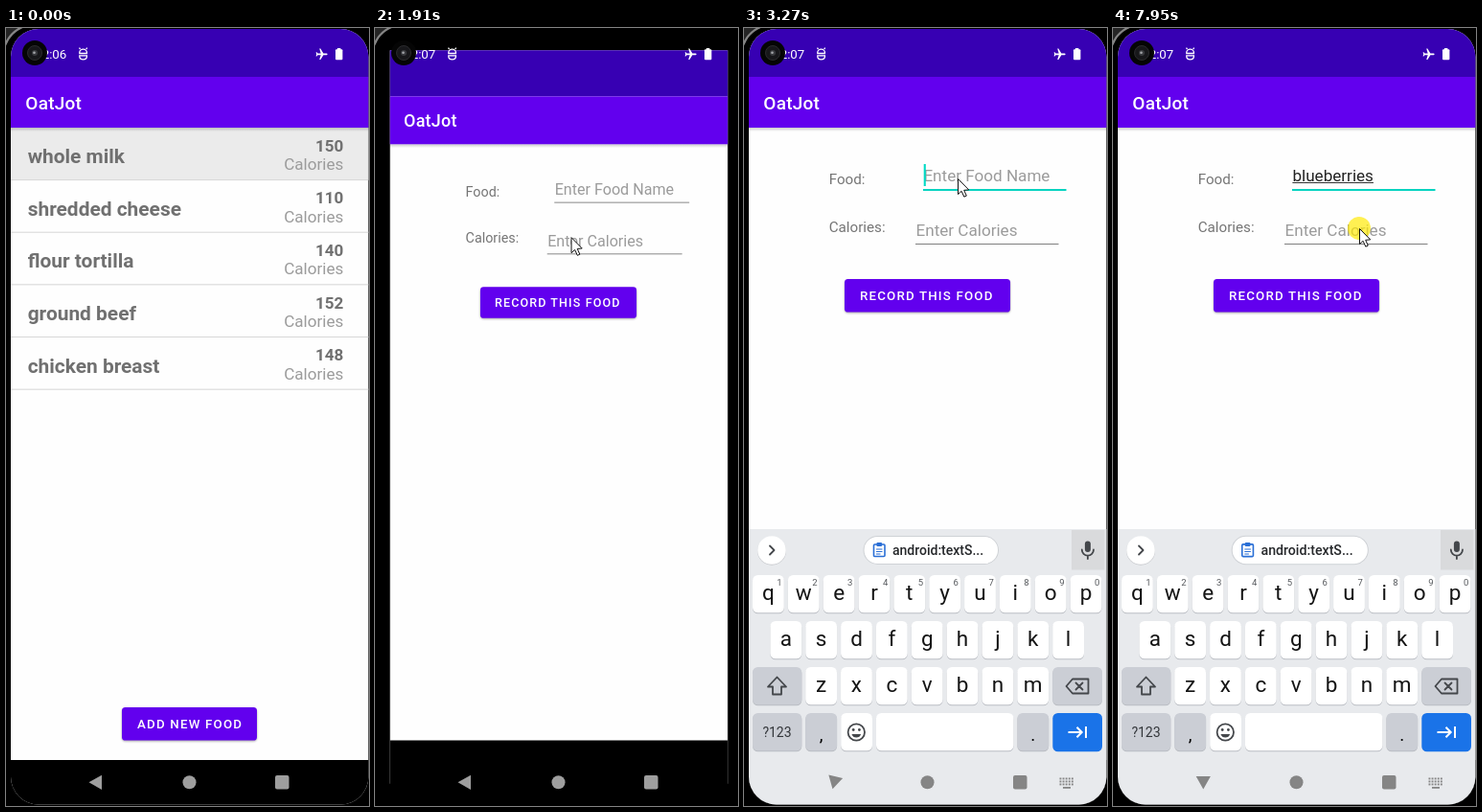
An HTML page that plays this animation: 379 px wide and 812 px high, repeating every 8 s.

```html
<!DOCTYPE html>
<html lang="en">
<head>
<meta charset="utf-8">
<title>Food log</title>
<style>
  html, body { margin: 0; width: 100%; height: 100%; overflow: hidden; background: #000; }
  svg { display: block; width: 379px; height: 812px; font-family: Roboto, "Noto Sans", sans-serif; }
  text { white-space: pre; }
  .mid { text-anchor: middle; }
  .end { text-anchor: end; }
  .bold { font-weight: 700; }
  .title { font-size: 19px; font-weight: 500; letter-spacing: .24px; fill: #fff; }
  .food { font-size: 20.9px; fill: #707070; }
  .num { font-size: 17.1px; fill: #707070; }
  .cal, .hint { font-size: 17.1px; fill: #9b9b9b; }
  .label { font-size: 15.2px; fill: #757575; }
  .entry { font-size: 17.1px; fill: #222; }
  .btn { font-size: 13.3px; font-weight: 500; letter-spacing: 1.19px; fill: #fff; }
  .key { font-size: 22.5px; fill: #141414; }
  .sup { font-size: 9.5px; fill: #55585c; }
  .line { fill: none; stroke: #44474b; stroke-width: 1.8; stroke-linejoin: round; stroke-linecap: round; }
</style>
</head>
<body>
<svg id="stage" viewBox="0 0 379 812"></svg>
<script>
const LOOP = 8000;
const APP = 'OatJot';
const WORD = 'blueberries';
const FIELD_X = 187.4;

const rect = (x, y, w, h, fill, r = 0, extra = '') =>
  `<rect x="${x}" y="${y}" width="${w}" height="${h}" rx="${r}" fill="${fill}" ${extra}/>`;
const text = (x, y, cls, str, extra = '') =>
  `<text x="${x}" y="${y}" class="${cls}" ${extra}>${str}</text>`;

const page = (id, body) => `<g id="${id}">
  ${rect(5, 0, 374, 812, '#fefefe')}
  ${rect(5, 104, 374, 4, 'url(#shade)')}
  ${rect(5, 0, 374, 51, '#3700b3')}
  ${rect(5, 51, 374, 53, '#6200ee')}
  ${text(20.3, 85, 'title', APP)}
  ${body}
  ${rect(5, 764, 374, 60, '#000')}
</g>`;

const button = (id, x, y, w, label) => `
  ${rect(x, y + 1.5, w, 34, '#000', 4, 'opacity=".35" filter="url(#soft)"')}
  ${rect(x, y + 6, w, 35, '#000', 4, `id="${id}Lift" opacity="0" filter="url(#wide)"`)}
  ${rect(x, y, w, 34.5, '#6200ee', 3.6)}
  ${rect(x, y, w, 34.5, '#fff', 3.6, `id="${id}Glow" opacity="0"`)}
  ${text(x + 16, y + 22.3, 'btn', label)}`;

function listBody() {
  const foods = [['whole milk', 150], ['shredded cheese', 110], ['flour tortilla', 140],
                 ['ground beef', 152], ['chicken breast', 148]];
  const rows = foods.map(([name, kcal], i) => {
    const y = i * 54.65;
    return text(22.7, 141 + y, 'food bold', name) +
      text(352.3, 128.7 + y, 'num bold end', kcal) +
      text(352.3, 148 + y, 'cal end', 'Calories') +
      rect(5, 158 + y, 374, 1.1, '#d9d9d9');
  });
  return rect(5, 104, 374, 54, '#ebebeb', 0, 'id="rowHi"') + rect(5, 104, 374, 4, 'url(#shade)') +
    rows.join('') + button('add', 121, 709, 141, 'ADD NEW FOOD');
}

const formBody = () =>
  text(88.7, 162.5, 'label', 'Food:') + text(88.7, 213.3, 'label', 'Calories:') +
  text(FIELD_X, 160, 'hint', 'Enter Food Name', 'id="hint"') +
  text(FIELD_X, 160, 'entry', WORD, 'id="entry"') +
  rect(FIELD_X, 161, 0, 1, '#333', 0, 'id="under"') +
  rect(187, 168, 149.5, 1, '#808080', 0, 'id="foodLine"') +
  rect(187, 142, 2.1, 23, '#03dac5', 0, 'id="caret"') +
  text(179.5, 217, 'hint', 'Enter Calories') +
  rect(179, 225, 149.5, 1, '#808080') +
  button('rec', 105, 262, 173, 'RECORD THIS FOOD');

function keyboard() {
  const pitch = 36.85, white = '#fff', grey = '#cbced5';
  const cap = (x, y, w, fill) =>
    rect(x, y + 1, w, 39.3, '#b9bcc2', 5.5) + rect(x, y, w, 39.3, fill, 5.5);
  const row = (keys, cx, y) => [...keys].map((k, i) =>
    cap(cx + i * pitch - 16.4, y, 32.8, white) +
    text(cx + i * pitch, y + 26.3, 'key mid', k)).join('');
  const sups = [...'1234567890'].map((d, i) =>
    text(37 + i * pitch, 582, 'sup mid', d)).join('');
  return `<g id="board">
    ${rect(5, 523, 374, 300, '#e8eaed')}
    <circle cx="29" cy="545.7" r="15" fill="#c9cbcf"/><circle cx="29" cy="545" r="14.8" fill="#fff"/>
    <path class="line" d="M27 540.5l4.5 4.5-4.5 4.5"/>
    <g id="chip">
      ${rect(125, 530.5, 140.5, 29, '#fff', 14.5, 'stroke="#cfd2d6"')}
      ${rect(135.5, 539, 11.5, 12.5, 'none', 1, 'stroke="#2a6fd6" stroke-width="1.6"')}
      ${rect(138.4, 537, 5.7, 4, '#2a6fd6', 1)}
      <path d="M138 544h6.5M138 546.5h6.5M138 549h4.5" stroke="#2a6fd6"/>
      ${text(155, 550.2, '', 'android:textS...', 'font-size="14" font-weight="500" fill="#26282b"')}
    </g>
    ${rect(342, 524, 34.5, 41.5, '#d9dadc')}
    ${rect(355.9, 535.5, 6, 11.5, '#44474b', 3)}
    <path class="line" d="M352.8 544.5a6.1 6.1 0 0 0 12.2 0M358.9 551v3"/>
    ${row('qwertyuiop', 25.4, 571)}${sups}
    ${row('asdfghjkl', 43.8, 619)}
    ${row('zxcvbnm', 80.6, 667)}
    ${cap(9, 667, 51.3, grey)}${cap(322.3, 667, 51.7, grey)}
    <path class="line" d="M34.5 677.5l-9.5 10h5v8h9v-8h5z"/>
    <path class="line" d="M343 679.5h16.5v15H343l-6.5-7.5zM346.5 683.5l7 7m0-7l-7 7"/>
    ${cap(9, 715, 51.3, grey)}
    ${text(34.5, 740, 'mid', '?123', 'font-size="14" fill="#33363a"')}
    ${cap(64.3, 715, 32.8, grey)}${text(80.7, 744, 'mid', ',', 'font-size="19"')}
    ${cap(101.2, 715, 32.8, white)}
    <circle class="line" cx="117.3" cy="735" r="8.7"/>
    <circle cx="114.2" cy="732.5" r="1.4" fill="#44474b"/><circle cx="120.4" cy="732.5" r="1.4" fill="#44474b"/>
    <path d="M112.5 737h9.6a5 5 0 0 1-9.6 0z" fill="#44474b"/>
    ${cap(138, 715, 143.5, white)}
    ${cap(285.4, 715, 32.8, grey)}${text(301.8, 744, 'mid', '.', 'font-size="19"')}
    ${rect(322.3, 715, 51.7, 40.3, '#1a73e8', 5.5)}
    <path d="M338.5 735h14m-5-5.2l5.2 5.2-5.2 5.2M357 729v12" fill="none" stroke="#fff" stroke-width="2"/>
  </g>`;
}

function imeIcon() {
  let dots = '';
  for (let i = 0; i < 15; i++) dots += rect(329.5 + i % 5 * 3.1, 782.5 + (i / 5 | 0) * 3, 1.9, 1.9, 'currentColor');
  return `<g id="ime">${dots}${rect(333, 792, 8, 1.8, 'currentColor')}</g>`;
}

const nav = `<g id="nav">
  <path id="back" d="M86.5 787.3L100 779.7v15.2z" fill="currentColor"/>
  <circle cx="191.5" cy="787.3" r="7" fill="currentColor"/>
  ${rect(281, 780, 14.5, 14.5, 'currentColor', 2)}${imeIcon()}
</g>`;

const status = `
  ${text(63.3, 32, 'end', '2:06', 'id="clock" font-size="13.3" fill="#fff"')}
  <g fill="none" stroke="#fff" stroke-width="1.3">
    <path d="M76.8 26.5v-1a3.8 3.3 0 0 1 7.6 0v1zM76.8 28.8h7.6v1a3.8 3 0 0 1-7.6 0zM77.5 22l-1-1.3M83.7 22l1-1.3"/>
  </g>
  <path transform="translate(329.6 27.3) rotate(90) scale(.6) translate(-11.5 -12)" fill="#fff"
    d="M21 16v-2l-8-5V3.5a1.5 1.5 0 0 0-3 0V9l-8 5v2l8-2.5V19l-2 1.5V22l3.5-1 3.5 1v-1.5L13 19v-5.5l8 2.5z"/>
  ${rect(344, 22.3, 7.4, 10.9, '#fff', 1)}${rect(346, 21, 3.4, 2, '#fff')}
  <circle cx="30" cy="26" r="13" fill="#050505"/>
  <circle cx="30" cy="26" r="7.5" fill="#17171a" stroke="#2b2b2e"/>
  <circle cx="30" cy="26" r="3" fill="#38393d"/><circle cx="29.5" cy="25.8" r="1.3" fill="#a5a7ab"/>`;

const stage = document.getElementById('stage');
stage.innerHTML = `
  <defs>
    <clipPath id="screen"><rect x="5" y="1" width="373.4" height="809.5" rx="29"/></clipPath>
    <linearGradient id="shade" x2="0" y2="1">
      <stop stop-color="#000" stop-opacity=".2"/><stop offset="1" stop-color="#000" stop-opacity="0"/>
    </linearGradient>
    <filter id="soft" x="-10%" y="-30%" width="120%" height="160%"><feGaussianBlur stdDeviation="1.3"/></filter>
    <filter id="wide" x="-10%" y="-50%" width="120%" height="200%"><feGaussianBlur stdDeviation="3"/></filter>
  </defs>
  ${rect(0, 0, 379, 812, '#000')}
  <path d="M0 0h14A30 30 0 0 0 0 14z" fill="#252525"/>
  <path d="M-1 18A34 34 0 0 1 17 -1" fill="none" stroke="#858585" stroke-width="2.2"/>
  <g clip-path="url(#screen)">
    ${page('list', listBody())}${page('form', formBody())}${keyboard()}${nav}${status}
  </g>
  <circle id="tap" r="12" fill="#ffe900" opacity=".68"/>
  <path id="mouse" d="M.5 .5V16.6L4.1 13.3 6.8 19.2 9.3 18.1 6.7 12.3 11.7 11.9z"
    fill="#fff" stroke="#111" stroke-linejoin="round"/>`;

const el = {};
stage.querySelectorAll('[id]').forEach(n => el[n.id] = n);

// Each track is [time, value, ...] with linear steps between.
const tracks = {
  mouse: [[130, 260, 773], [550, 208, 731], [1250, 208, 731], [1400, 207, 610], [1600, 204, 350],
          [1780, 203, 232], [1950, 205, 214], [2250, 212, 202], [2520, 223, 157], [7420, 223, 157],
          [7580, 262, 203], [7680, 257, 209]],
  oldScale: [[1740, 1], [1780, 1.003], [1850, 1.05], [1950, 1.12], [2150, 1.15]],
  newScale: [[1740, .85], [1780, .853], [1850, .9], [1950, .97], [2150, 1]],
  newAlpha: [[1790, 0], [1870, 1]],
  press: [[950, 0], [1100, 1]],
  rowHi: [[950, 1], [1030, 0]],
  slide: [[2990, 289], [3050, 210], [3120, 95], [3190, 25], [3260, 0]],
  boardAlpha: [[2990, 0], [3050, .17], [3120, .7], [3180, 1]],
  turn: [[3060, 0], [3270, -76], [3340, -90]],
  navTone: [[3050, 158], [3200, 133]],
  chip: [[3270, 1], [3340, 1.012]]
};
const typed = [3610, 3810, 4030, 4280, 5270, 6010, 6190, 6390, 6610, 6930, 7260];
const lined = [3810, 4030, 4280, 4540, 5550, 6190, 6390, 6610, 6930, 7260, 7500];
const taps = [[950, 1150], [2590, 2720], [7830, 8000]];
const caretOn = [[2620, 3410], [3610, 5090], [5270, 7830]];

function at(name, t) {
  const k = tracks[name];
  if (t <= k[0][0]) return k[0].slice(1);
  const i = k.findIndex(s => s[0] > t);
  if (i < 0) return k[k.length - 1].slice(1);
  const a = k[i - 1], b = k[i], p = (t - a[0]) / (b[0] - a[0]);
  return a.slice(1).map((v, j) => v + (b[j + 1] - v) * p);
}
const one = (name, t) => at(name, t)[0];
const set = (node, attr, value) => node.setAttribute(attr, value);
const show = (node, on) => set(node, 'visibility', on ? 'inherit' : 'hidden');
const within = (spans, t) => spans.some(([a, b]) => t >= a && t < b);
const count = (times, t) => times.filter(x => x <= t).length;
const zoom = (s, x, y) => `translate(${x} ${y}) scale(${s}) translate(${-x} ${-y})`;

const ruler = document.createElement('canvas').getContext('2d');
function widthOf(n) {
  ruler.font = '17.1px Roboto, "Noto Sans", sans-serif';
  return ruler.measureText(WORD.slice(0, n)).width;
}

function draw(t) {
  const [x, y] = at('mouse', t);
  set(el.mouse, 'transform', `translate(${x} ${y})`);
  set(el.tap, 'transform', `translate(${x} ${y})`);
  show(el.mouse, t >= 130);
  show(el.tap, within(taps, t));
  el.clock.textContent = t < 700 ? '2:06' : '2:07';

  const press = one('press', t);
  set(el.addGlow, 'opacity', press * .08);
  set(el.addLift, 'opacity', press * .3);
  set(el.rowHi, 'opacity', one('rowHi', t));

  set(el.list, 'transform', zoom(one('oldScale', t), 191.5, 406));
  set(el.form, 'transform', zoom(one('newScale', t), 191.5, 406));
  set(el.form, 'opacity', one('newAlpha', t));
  show(el.form, t >= 1790);
  show(el.list, t < 1880);

  const n = count(typed, t), focus = t >= 2590;
  show(el.hint, n === 0);
  el.entry.textContent = WORD.slice(0, n);
  set(el.under, 'width', widthOf(count(lined, t)));
  set(el.foodLine, 'fill', focus ? '#03d3c0' : '#808080');
  set(el.foodLine, 'height', focus ? 2 : 1);
  set(el.caret, 'x', FIELD_X + widthOf(n) + .3);
  show(el.caret, within(caretOn, t));

  set(el.board, 'transform', `translate(0 ${one('slide', t)})`);
  set(el.board, 'opacity', one('boardAlpha', t));
  show(el.board, t >= 2990);
  set(el.chip, 'transform', zoom(one('chip', t), 195, 545));
  const tone = one('navTone', t);
  set(el.nav, 'color', `rgb(${tone},${tone},${tone})`);
  set(el.back, 'transform', `rotate(${one('turn', t)} 94 787)`);
  show(el.ime, t >= 2990);
}

const start = performance.now();
function tick() {
  draw((performance.now() - start) % LOOP);
  requestAnimationFrame(tick);
}
tick();
</script>
</body>
</html>
```
